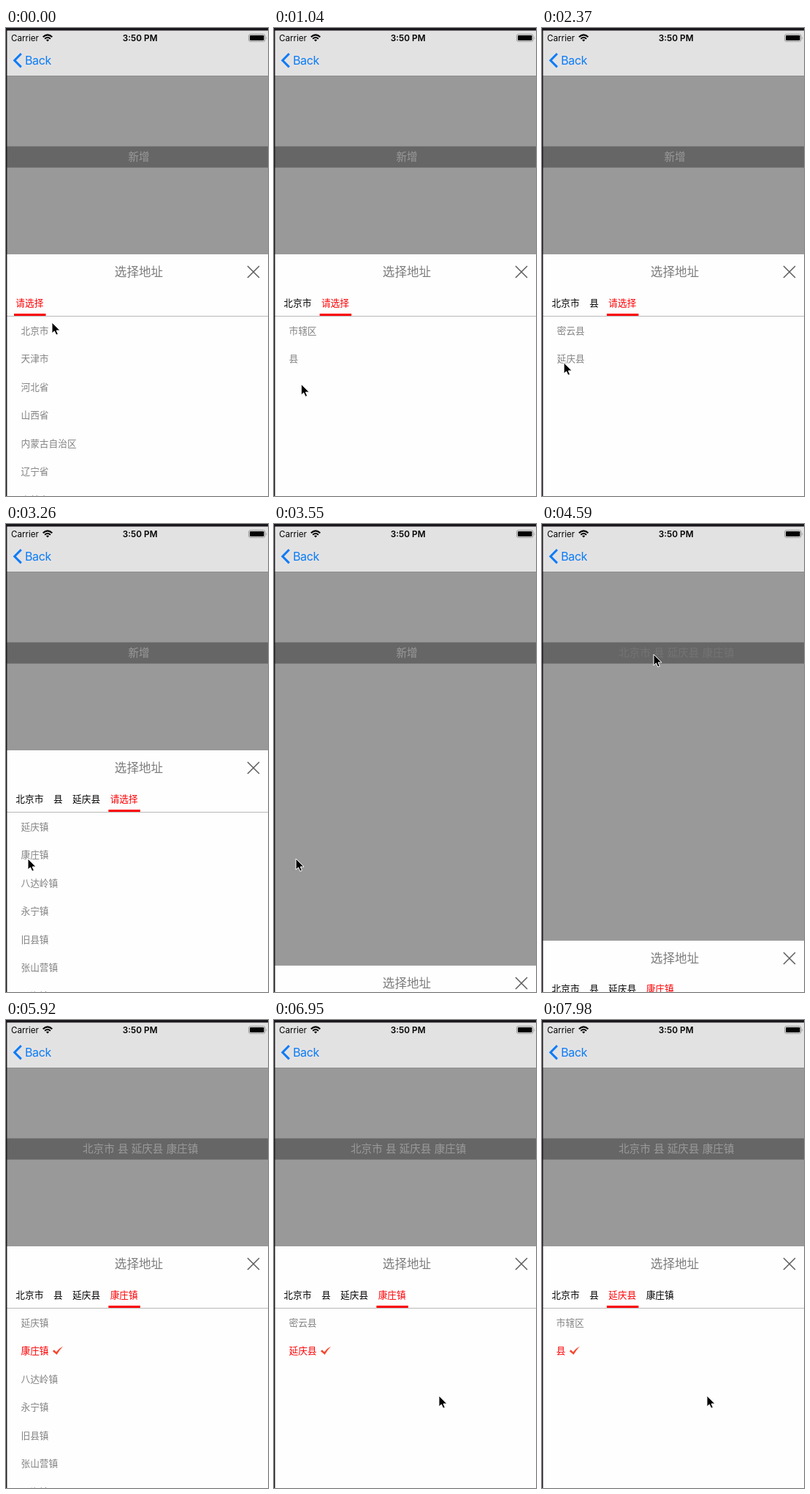
These frames come from a looping animation (359x639 px, 8000 ms). An HTML page:

```html
<!DOCTYPE html>
<html lang="zh-CN">
<head>
<meta charset="utf-8">
<title>选择地址</title>
<style>
  html, body { margin: 0; width: 100%; height: 100%; overflow: hidden; background: #fefefe; }
  svg { display: block; }
  text { font-family: "Noto Sans CJK SC", "Noto Sans CJK", sans-serif; font-size: 12.7px; }
  .latin { font-family: Inter, Roboto, sans-serif; font-size: 11.6px; }
  .clock { font-size: 11.8px; font-weight: 600; }
  .back { font-size: 16px; letter-spacing: -.4px; fill: #0a7cf6; }
  .caption { font-size: 14.6px; word-spacing: .9px; fill: #fff; text-anchor: middle; }
  .heading { font-size: 16.6px; fill: #7c7c7c; text-anchor: middle; }
  .row { fill: #828282; }
  .on { fill: #fe0004; }
</style>
</head>
<body>
<svg width="359" height="639" viewBox="0 0 359 639">
  <rect width="359" height="639" fill="#fefefe"/>
  <rect y="161.6" width="359" height="29" fill="#aaa"/>
  <text id="caption" class="caption" y="181.4"></text>
  <rect id="dim" y="65" width="359" height="574" opacity=".4"/>

  <rect id="nav" width="359" height="65"/>
  <rect id="navLine" y="65" width="359" height="1"/>
  <text class="latin" x="7" y="17.5">Carrier</text>
  <g fill="none" stroke="#000" stroke-width="2">
    <path d="M50.7 12.2Q57 6.6 63.3 12.2M53.1 14.7Q57 11.2 60.9 14.7"/>
    <path d="M57 18.6L54.9 16.3Q57 14.6 59.1 16.3Z" fill="#000" stroke="none"/>
  </g>
  <text class="latin clock" x="183.7" y="17.5" text-anchor="middle">3:50 PM</text>
  <rect x="332.5" y="8.5" width="22.5" height="10" rx="2.5" fill="none" stroke="#999"/>
  <rect x="334" y="10" width="19.5" height="7" rx="1.2"/>
  <path d="M356.5 11.5Q358 13.5 356.5 15.5Z" fill="#999"/>
  <path d="M20.8 35L11.7 44.2L20.8 53.4" fill="none" stroke="#0a7cf6" stroke-width="3"/>
  <text class="latin back" x="26" y="50">Back</text>

  <g id="sheet">
    <rect y="309" width="359" height="330" fill="#fefefe"/>
    <text class="heading" x="182" y="339.2">选择地址</text>
    <path d="M331 325L347 341M347 325L331 341" stroke="#5c5c5c" stroke-width="1.5"/>
    <g id="pages"></g>
    <rect y="393" width="359" height="1" fill="#b9b9b9"/>
    <g id="tabs"></g>
  </g>
  <path id="cursor" d="M0 0V15L3.4 11.9L5.8 17.2L8.4 16.1L6.1 11H11Z" stroke="#fff"/>
  <path d="M0 0H359V3.6H1.4V639H0Z" fill="#1b181d"/>
</svg>
<script>
const LOOP = 8000;
const BEAT = 147.69;       // the picture is held between even beats
const PAGE_WIDTH = 361, SHEET_HEIGHT = 330, ROW_HEIGHT = 38.5, CHAR = 12.7, TAB_GAP = 13.5;
const PROMPT = '请选择';
const LISTS = [
  ['北京市', '天津市', '河北省', '山西省', '内蒙古自治区', '辽宁省', '吉林省'],
  ['市辖区', '县'],
  ['密云县', '延庆县'],
  ['延庆镇', '康庄镇', '八达岭镇', '永宁镇', '旧县镇', '张山营镇', '四海镇'],
];
const PICKS = [
  { name: '北京市', time: 440 },
  { name: '县', time: 1990 },
  { name: '延庆县', time: 2554 },
  { name: '康庄镇', time: 3250 },
];
const SWIPES = [6340, 7480];
const SWIPE_MS = 510;
const CLOSED = 3600, REOPENED = 4400, TAB_SYNC = 7200;
const POINTER_START = { x: 63, y: 402 };
const POINTER_MOVES = [
  { time: 150, ms: 300, x: 44, y: 413 },
  { time: 600, ms: 580, x: 36, y: 500 },
  { time: 1190, ms: 430, x: 30, y: 457 },
  { time: 3610, ms: 820, x: 153, y: 178 },
  { time: 5100, ms: 650, x: 73, y: 501 },
  { time: 6300, ms: 500, x: 226, y: 513 },
  { time: 6950, ms: 450, x: 100, y: 513 },
  { time: 7480, ms: 450, x: 226, y: 513 },
];

const $ = id => document.getElementById(id);
const label = (str, x, y, cls) => `<text x="${x}" y="${y}" class="${cls}">${str}</text>`;
const sum = (items, fn) => items.reduce((total, item) => total + fn(item), 0);

// Smooth 0 to 1 over ms, beginning at start.
function glide(t, start, ms) {
  const k = Math.min(1, Math.max(0, (t - start) / ms));
  return k * k * (3 - 2 * k);
}

const pageAt = t =>
  sum(PICKS.slice(0, 3), pick => glide(t, pick.time, 200)) -
  sum(SWIPES, start => glide(t, start, SWIPE_MS));

const dropAt = t => SHEET_HEIGHT * (glide(t, 3330, 270) - glide(t, 4516, 210));

const pointerAt = t => POINTER_MOVES.reduce((from, to) => {
  const k = glide(t, to.time, to.ms);
  return { x: from.x + (to.x - from.x) * k, y: from.y + (to.y - from.y) * k };
}, POINTER_START);

function tabs(t, picked) {
  const names = PICKS.slice(0, picked).map(pick => pick.name);
  if (picked < PICKS.length) names.push(PROMPT);
  const active = t > TAB_SYNC ? 2 : names.length - 1;
  let x = 13.3, html = '';
  names.forEach((name, i) => {
    html += label(name, x, 379.5, i === active ? 'on' : '');
    if (i === active) html += `<rect x="${x - 2.3}" y="390" width="43.5" height="3" class="on"/>`;
    x += name.length * CHAR + TAB_GAP;
  });
  return html;
}

function list(rows, pick, left) {
  return rows.map((name, i) => {
    const y = 417.5 + i * ROW_HEIGHT, on = name === pick;
    const tick = `<path transform="translate(${left + name.length * CHAR + 5.3} ${y - 10.6})"
      fill="#f5482f" d="M0 6.8L2 4.8L5 7.8Q9 2.6 14.2 0Q9.8 4.6 5.7 11.6Z"/>`;
    return label(name, left, y, on ? 'on' : 'row') + (on ? tick : '');
  }).join('');
}

function pages(t, picked) {
  return LISTS.map((rows, i) => {
    const shift = (i - pageAt(t)) * PAGE_WIDTH;
    const visible = Math.abs(shift) < PAGE_WIDTH && i <= picked;
    return visible ? list(rows, i < picked && PICKS[i].name, 20.5 + shift) : '';
  }).join('');
}

function drawCaption(t) {
  const filled = t > CLOSED + BEAT;
  const pressed = t > REOPENED && t < REOPENED + 200;
  const caption = $('caption');
  caption.textContent = filled ? PICKS.map(pick => pick.name).join(' ') : '新增';
  caption.setAttribute('x', filled ? 184.2 : 182);
  caption.setAttribute('opacity', pressed ? .25 : filled ? 1 : 1 - glide(t, 3560, 170));
}

function draw(t) {
  const picked = PICKS.filter(pick => pick.time <= t).length;
  const dimmed = t < CLOSED || t > REOPENED;
  const { x, y } = pointerAt(t);
  drawCaption(t);
  $('dim').style.display = dimmed ? '' : 'none';
  $('nav').setAttribute('fill', dimmed ? '#e3e2e3' : '#fcfcfc');
  $('navLine').setAttribute('fill', dimmed ? '#8e8e8e' : '#c9c9c9');
  $('sheet').setAttribute('transform', `translate(0 ${dropAt(t)})`);
  $('pages').innerHTML = pages(t, picked);
  $('tabs').innerHTML = tabs(t, picked);
  $('cursor').setAttribute('transform', `translate(${x} ${y})`);
  $('cursor').style.display = t > 5900 && t < SWIPES[0] ? 'none' : '';
}

let start, shown = 0;
function tick(now) {
  start ??= now;
  const beat = Math.floor(((now - start) % LOOP) / BEAT);
  if (beat !== shown) draw((shown = beat) * BEAT);
  requestAnimationFrame(tick);
}
draw(0);
requestAnimationFrame(tick);
</script>
</body>
</html>
```
